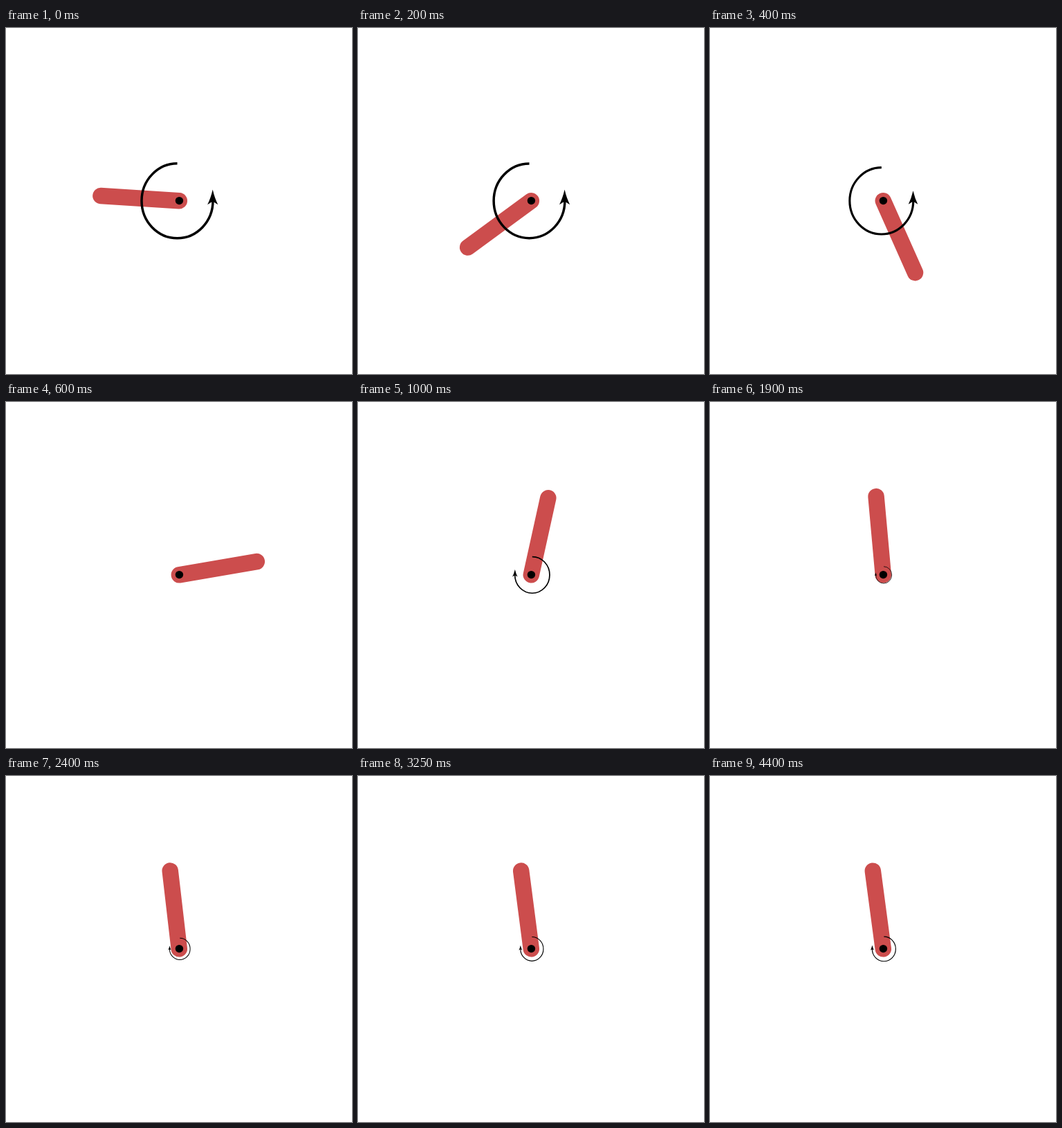
Recreate the animation shown at these times as an HTML page with a canvas. Size 500 px wide and 500 px high, loop 10 s.

```html
<!DOCTYPE html>
<html lang="en">
<head>
<meta charset="utf-8">
<title>Pendulum swing-up</title>
<style>
  html, body { margin: 0; width: 100%; height: 100%; overflow: hidden; background: #fff; }
  canvas { display: block; width: 100vw; height: 100vh; }
</style>
</head>
<body>
<canvas id="stage" width="500" height="500"></canvas>
<script>
const ctx = document.getElementById('stage').getContext('2d');
const LOOP = 10000;
const STEP = 50;
const DT = STEP / 1000;
const UNIT = 500 / 4.4;
const SWING_STEPS = 12;
const REST = 0.133;

// Torque fades from 2 to 0 while the rod swings through the bottom
function push(step) {
  return 2 * (1 - (step / SWING_STEPS) ** 5.5);
}

// Rod of unit length and mass, angle counterclockwise from upright
function swing(steps) {
  let angle = -4.776, speed = 0.88;
  for (let i = 1; i <= steps; i++) {
    speed += DT * (15 * Math.sin(angle) + 3 * push(i));
    angle += DT * speed;
  }
  return angle;
}

const RELEASE = swing(SWING_STEPS);

// The rod creeps to its resting lean: a fast and a slow decay
function settle(step) {
  const t = (step - SWING_STEPS) * DT;
  const slow = 0.4, fast = REST - RELEASE - slow;
  return REST - fast * Math.exp(-5.03 * t) - slow * Math.exp(-1.75 * t);
}

// A braking pulse, then just enough torque to hold the lean
function brake(step, angle) {
  const pulse = Math.exp(-(((step - 20.5) / 3.2) ** 2));
  return -pulse - 5 * Math.sin(Math.max(angle, 0));
}

function pose(step) {
  if (step <= SWING_STEPS) return { angle: swing(step), torque: push(step) };
  const angle = settle(step);
  return { angle, torque: brake(step, angle) };
}

function drawRod(angle) {
  ctx.strokeStyle = 'rgb(204,77,77)';
  ctx.lineWidth = 23.5;
  ctx.lineCap = 'round';
  ctx.beginPath();
  ctx.moveTo(250.3, 249.8);
  ctx.lineTo(250.3 - UNIT * Math.sin(angle), 249.8 - UNIT * Math.cos(angle));
  ctx.stroke();
}

function drawAxle() {
  ctx.fillStyle = '#000';
  ctx.beginPath();
  ctx.arc(250.4, 249.6, UNIT * 0.05, 0, Math.PI * 2);
  ctx.fill();
}

// Size shows the strength of the torque, mirroring its direction
function drawArrow(torque) {
  const scale = torque / 2;
  ctx.save();
  ctx.translate(250.4, 250);
  ctx.scale(scale, Math.abs(scale));
  ctx.strokeStyle = ctx.fillStyle = '#000';
  ctx.lineWidth = 3.5;
  ctx.lineCap = 'butt';
  ctx.beginPath();
  ctx.ellipse(-2.9, -0.2, 51.5, 54, 0, -Math.PI / 2, 0, true);
  ctx.stroke();
  ctx.beginPath();
  ctx.moveTo(48.3, -16.5);
  ctx.quadraticCurveTo(51.2, -4, 55.9, 5.2);
  ctx.lineTo(48.3, 0.5);
  ctx.lineTo(40.7, 5.2);
  ctx.quadraticCurveTo(45.4, -4, 48.3, -16.5);
  ctx.fill();
  ctx.restore();
}

function draw(ms) {
  const { angle, torque } = pose(Math.floor((ms % LOOP) / STEP));
  ctx.fillStyle = '#fff';
  ctx.fillRect(0, 0, 500, 500);
  drawRod(angle);
  drawAxle();
  drawArrow(torque);
}

const start = performance.now();
function tick() {
  draw(performance.now() - start);
  requestAnimationFrame(tick);
}
tick();
</script>
</body>
</html>
```
